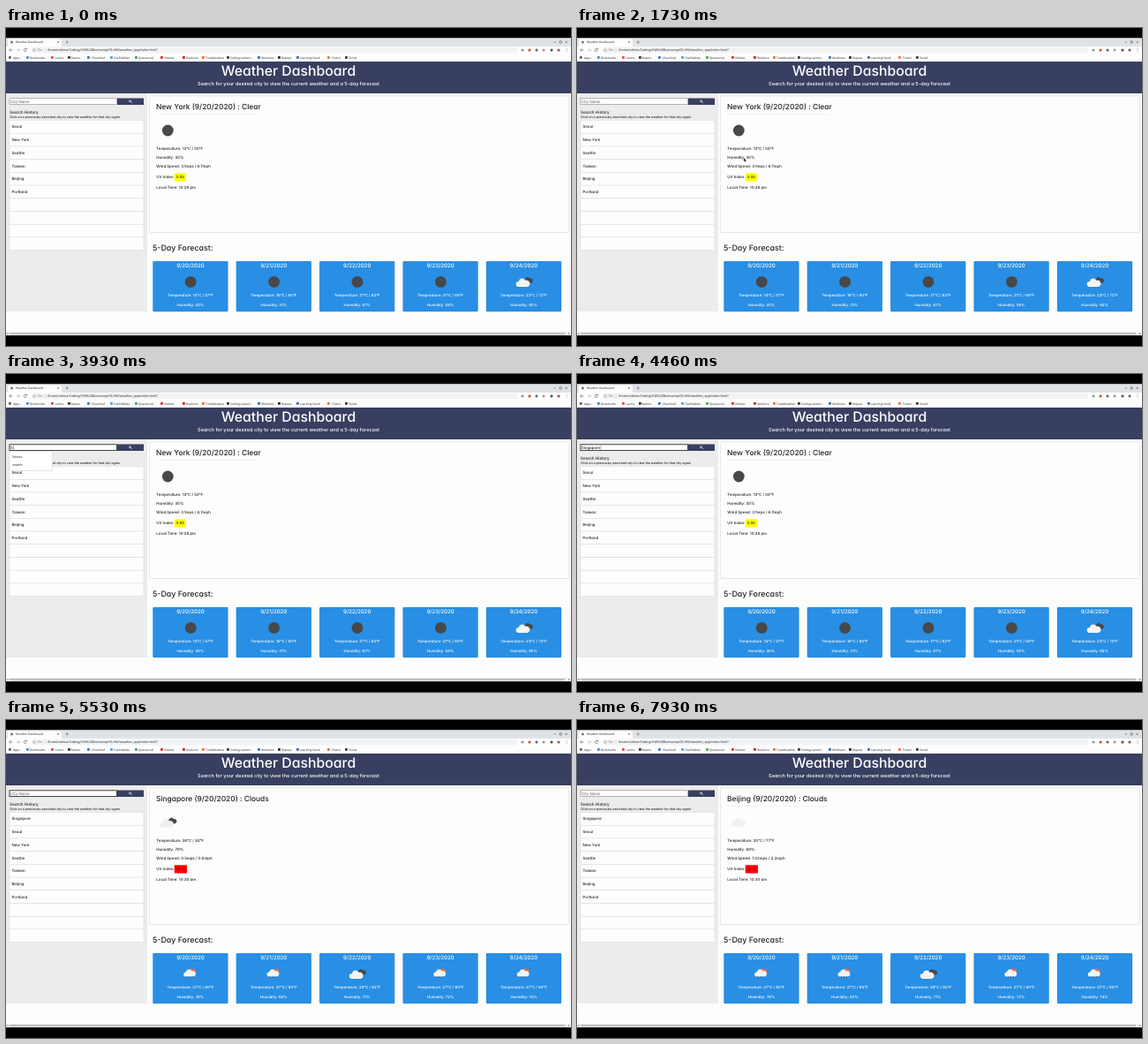
An HTML page for the animation above (8 s loop, 640 by 360 pixels).

```html
<!DOCTYPE html>
<html lang="en">
<head>
<meta charset="utf-8">
<title>Weather Dashboard</title>
<style>
html, body { margin: 0; width: 100%; height: 100%; overflow: hidden; background: #fff; }
svg { display: block; width: 100vw; height: 100vh; }
text { font-family: Inter, Lato, sans-serif; font-weight: 500; font-feature-settings: "cv11"; text-rendering: geometricPrecision; white-space: pre; }
.ui { font-family: "Open Sans", "Noto Sans", sans-serif; font-weight: 400; }
</style>
</head>
<body>
<svg id="stage" viewBox="0 0 640 360">
  <g id="page"></g>
  <g id="live"></g>
  <path id="pointer" d="M0 0V4.6L1.1 3.6L1.9 5.2L2.6 4.9L1.9 3.3H3.3Z" fill="#111" stroke="#fff" stroke-width=".3"/>
</svg>
<script>
const LOOP = 8000;
const NAVY = '#383f60', BLUE = '#288fe4', INK = '#222', PAPER = '#fdfdfd';
const $ = id => document.getElementById(id);

const rect = (x, y, w, h, fill, extra = '') =>
  `<rect x="${x}" y="${y}" width="${w}" height="${h}" fill="${fill}" ${extra}/>`;
const dot = (x, y, r, fill) => `<circle cx="${x}" cy="${y}" r="${r}" fill="${fill}"/>`;
const line = (d, color, width = .6) =>
  `<path d="${d}" fill="none" stroke="${color}" stroke-width="${width}"/>`;
const text = (x, y, size, str, fill = INK, extra = '') =>
  `<text x="${x}" y="${y}" font-size="${size}" fill="${fill}" ${extra}>${str}</text>`;
const ui = (x, y, size, str, fill = '#222') => text(x, y, size, str, fill, 'class="ui"');
const centered = (x, y, size, str) => text(x, y, size, str, '#fff', 'text-anchor="middle"');

const cloud = (x, y, scale, fill) =>
  `<path transform="translate(${x} ${y}) scale(${scale})" fill="${fill}"
    d="M-6 4.5a3 3 0 0 1 .3-6a4 4 0 0 1 7.5-1.2a3.6 3.6 0 0 1 2.4 7.2z"/>`;

const icons = {
  clear: (x, y) => dot(x + .3, y, 6.4, '#484848'),
  broken: (x, y, fill) => cloud(x + 5.6, y - 2, .7, '#484848') + cloud(x, y + 1, 1, fill),
  plain: (x, y, fill) => cloud(x + 1, y, 1, fill),
  rain: (x, y, fill) => dot(x + 2.2, y - 1.8, 4, '#ec6e4c') + cloud(x, y - .8, .88, fill) +
    [-3.5, -.5, 2.5].map(dx => line(`M${x + dx} ${y + 2.8}l-.8 1.7`, '#484848', .8)).join('')
};

const bookmarks = [
  [3, 8, 'Apps', '#5f6368'], [23, 27, 'Bookmarks', '#4a7fe0'], [51, 55.5, 'Lumto', '#d9483b'],
  [70, 73.5, 'Bazeru', '#333'], [92, 97, 'Chumleaf', '#2f6fd0'], [118, 122, 'CitePebbles', '#4d9fd6'],
  [146, 150, 'Questorval', '#4a9c54'], [175, 179, 'Vidoleo', '#e02020'], [200, 204, 'Reelumo', '#c01822'],
  [222, 226, 'TuneMeadow', '#f06a20'], [250, 254, 'Coding Lantern', '#333'], [285, 289, 'Worklano', '#2867b2'],
  [308, 312, 'Repova', '#222'], [329, 333, 'Learning Nook', '#3b62b0'], [364, 369, 'Forkol', '#e8702a'],
  [384, 388, 'Tackel', '#333']
];

function browser() {
  return rect(0, 0, 640, 360, '#000') + rect(0, 11.5, 640, 336.5, PAPER) +
    rect(0, 11.5, 640, 9.5, '#dfe3e8') +
    `<path d="M2 21V14.5q0-2 2-2H61q2 0 2 2V21z" fill="${PAPER}"/>` +
    dot(6.5, 16, 1.5, '#777') + ui(11, 17.2, 3.35, 'Weather Dashboard') +
    line('M58 15l2 2m0-2l-2 2M67.5 16h3.4m-1.7-1.7v3.4', '#555', .5) +
    line('M620.5 16h2.5M627 14.8h2.3v2.3h-2.3zM633.5 14.8l2.3 2.3m0-2.3l-2.3 2.3', '#444', .5) +
    rect(29, 21.7, 550, 6.8, '#f1f3f4', 'rx="3.4"') +
    line('M7.5 25H3.8m1.6-1.6L3.8 25l1.6 1.6', '#555') +
    line('M12 25h3.7m-1.6-1.6l1.6 1.6l-1.6 1.6', '#aaa') +
    line('M23.4 24a1.7 1.7 0 1 0 .1 1.6M23.6 22.9v1.3h-1.3', '#555') +
    line('M32 23.5a1.5 1.5 0 1 0 .1 0M32 24.8v1.2', '#777', .4) +
    ui(35.5, 26.2, 3.5, 'File', '#777') + line('M44 23.2v3.7', '#bbb', .4) +
    ui(47, 26.3, 3.62, '/home/selena/Coding/UW%20Bootcamp/06-HW/weather_app/index.html?') +
    [[585, '#999'], [593, '#d94a35'], [601, '#666'], [609, '#b09a90'], [618, '#555'], [626, '#8b5a48']]
      .map(([x, c]) => dot(x, 25, 1.6, c)).join('') +
    [23.4, 25, 26.6].map(y => dot(635, y, .45, '#555')).join('') +
    bookmarks.map(([icon, x, name, color]) =>
      rect(icon, 32, 2.8, 2.8, color, 'rx=".5"') + ui(x, 34.6, 3.3, name)).join('');
}

function dashboard() {
  let out = rect(0, 38, 640, 36, NAVY) +
    centered(320, 54, 15.8, 'Weather Dashboard') +
    centered(320, 65.2, 5.55, 'Search for your desired city to view the current weather and a 5-day forecast') +
    rect(0, 74, 160, 247, '#ececec') +
    text(4, 96.8, 4.6, 'Search History') +
    text(4, 102.4, 3.56, 'Click on a previously searched city to view the weather for that city again') +
    rect(126, 79.5, 30, 7.5, NAVY) + dot(140.6, 82.8, 1.3, '#fff') + dot(140.6, 82.8, .7, NAVY) +
    line('M141.5 83.7l1.3 1.3', '#fff', .7) +
    rect(162.5, 77, 475, 154.5, PAPER, 'rx="1" stroke="#dedede" stroke-width=".7"') +
    text(166, 252.4, 8.85, '5-Day Forecast:') +
    rect(0, 344, 640, 4, '#f1f1f1') + rect(4, 344.7, 629, 2.6, '#c1c1c1') +
    '<path d="M2.4 344.9v2.2L1 346zM637 344.9v2.2l1.4-1.1z" fill="#555"/>';
  for (let i = 0; i < 10; i++)
    out += rect(4, 104.6 + i * 14.7, 152, 14.7, PAPER, 'stroke="#dedede" stroke-width=".6"');
  return out;
}

const history = ['Seoul', 'New York', 'Seattle', 'Taiwan', 'Beijing', 'Portland'];
const reports = {
  newYork: { title: 'New York (9/20/2020) : Clear', rule: 286, temp: '13°C / 55°F', humid: 35, wind: '3.1mps / 6.7mph' },
  singapore: { title: 'Singapore (9/20/2020) : Clouds', rule: 299, temp: '28°C / 82°F', humid: 79, wind: '0.5mps / 0.0mph' },
  beijing: { title: 'Beijing (9/20/2020) : Clouds', rule: 284, temp: '25°C / 77°F', humid: 69, wind: '1.02mps / 2.2mph' }
};
const forecasts = {
  newYork: [['clear', '14°C / 57°F', 40], ['clear', '16°C / 60°F', 31], ['clear', '17°C / 62°F', 67],
    ['clear', '21°C / 69°F', 59], ['broken', '23°C / 72°F', 65]],
  singapore: [['rain', '27°C / 80°F', 78], ['rain', '27°C / 80°F', 82], ['broken', '28°C / 82°F', 71],
    ['rain', '27°C / 80°F', 72], ['rain', '27°C / 80°F', 74]]
};
const suggestions = ['Selena', 'Roger', 'Tester', 'seattle', 'test', 'Test 2'];

function weather(t) {
  const r = reports[t < 5060 ? 'newYork' : t < 7460 ? 'singapore' : 'beijing'];
  const loaded = t >= 5260;
  const icon = !loaded ? 'clear' : t < 7530 ? 'broken' : 'plain';
  const rows = [[137.7, `Temperature: ${r.temp}`], [148, `Humidity: ${r.humid}%`],
    [158.3, `Wind Speed: ${r.wind}`], [170, 'UV Index:'],
    [181.8, `Local Time: ${loaded ? '10:30 am' : '10:28 pm'}`]];
  return text(170, 92.2, 8.4, r.title) + line(`M170 97.6H${r.rule}`, '#e6e6e6', .5) +
    icons[icon](183, 116, '#f0f0f0') +
    rows.map(([y, str]) => text(170.3, y, 4.38, str)).join('') +
    (loaded
      ? rect(190.7, 164.2, 14.3, 9.4, '#f00', 'rx="1"') + text(193, 170, 4.2, '10.67', '#a00000')
      : rect(190.7, 164.2, 13.2, 9.4, '#ff0', 'rx="1"') + text(193, 170, 4.2, '5.55'));
}

function cards(t) {
  return forecasts[t < 5260 ? 'newYork' : 'singapore'].map(([icon, temp, humid], i) => {
    const x = 166.3 + i * 94.4, mid = x + 42.6;
    return rect(x, 264, 85.2, 57, BLUE, 'rx="1.2" stroke="#000" stroke-opacity=".1" stroke-width=".4"') +
      centered(mid, 271.2, 6.1, `9/${20 + i}/2020`) + icons[icon](mid, 287.4, '#f4f4f4') +
      centered(mid, 304.4, 4.3, `Temperature: ${temp}`) + centered(mid, 314.9, 4.3, `Humidity: ${humid}%`);
  }).join('');
}

function typed(t) {
  if (t < 3800 || t >= 5060) return '';
  const count = t < 4000 ? 1 : 2 + Math.floor((t - 4000) / 65.7);
  return 'Singapore'.slice(0, count);
}

function search(t) {
  const focused = t >= 2130 && t < 7400;
  const word = typed(t);
  const box = rect(4, 79.8, 121.5, 6.8, PAPER,
    `stroke="${focused ? '#222' : '#888'}" stroke-width="${focused ? .85 : .6}"`);
  const caret = word ? '<tspan font-weight="400">|</tspan>' : '';
  const value = text(5, 84.8, 4.3, word ? word + caret : 'City Name', word ? INK : '#777');
  const options = t < 2260 || t >= 4000 ? [] :
    word ? suggestions.filter(s => /^s/i.test(s)) : suggestions;
  if (!options.length) return box + value;
  return box + value +
    rect(4, 87.4, 48.8, options.length * 9.25 + 3.6, '#fff', 'stroke="#ccc" stroke-width=".5"') +
    options.map((s, i) => ui(7, 94.9 + i * 9.25, 3.7, s)).join('');
}

function scene(t) {
  const cities = t < 5060 ? history : ['Singapore', ...history];
  return cities.map((c, i) => text(6.5, 113.1 + i * 14.8, 4.35, c)).join('') +
    weather(t) + cards(t) + search(t);
}

const mix = (a, b, p) => a + (b - a) * p;
function glide(t, start, end, [x0, y0], [x1, y1]) {
  const p = Math.min(1, Math.max(0, (t - start) / (end - start)));
  const e = p * p * (3 - 2 * p);
  return [mix(x0, x1, e), mix(y0, y1, e)];
}
function pointerAt(t) {
  const rest = [256.5, 181.5];
  if (t >= 1600 && t < 2860) return glide(t, 1600, 1930, rest, [62, 82]);
  if (t >= 2860 && t < 3560) return rest;
  if (t >= 6600 && t < 7660) return glide(t, 6600, 7400, rest, [14, 185]);
  return null;
}

let shown = '';
function draw(t) {
  const next = scene(t);
  if (next !== shown) $('live').innerHTML = shown = next;
  const at = pointerAt(t);
  $('pointer').setAttribute('visibility', at ? 'visible' : 'hidden');
  if (at) $('pointer').setAttribute('transform', `translate(${at})`);
}

$('page').innerHTML = browser() + dashboard();
const begin = performance.now();
function tick() {
  draw((performance.now() - begin) % LOOP);
  requestAnimationFrame(tick);
}
tick();
</script>
</body>
</html>
```
